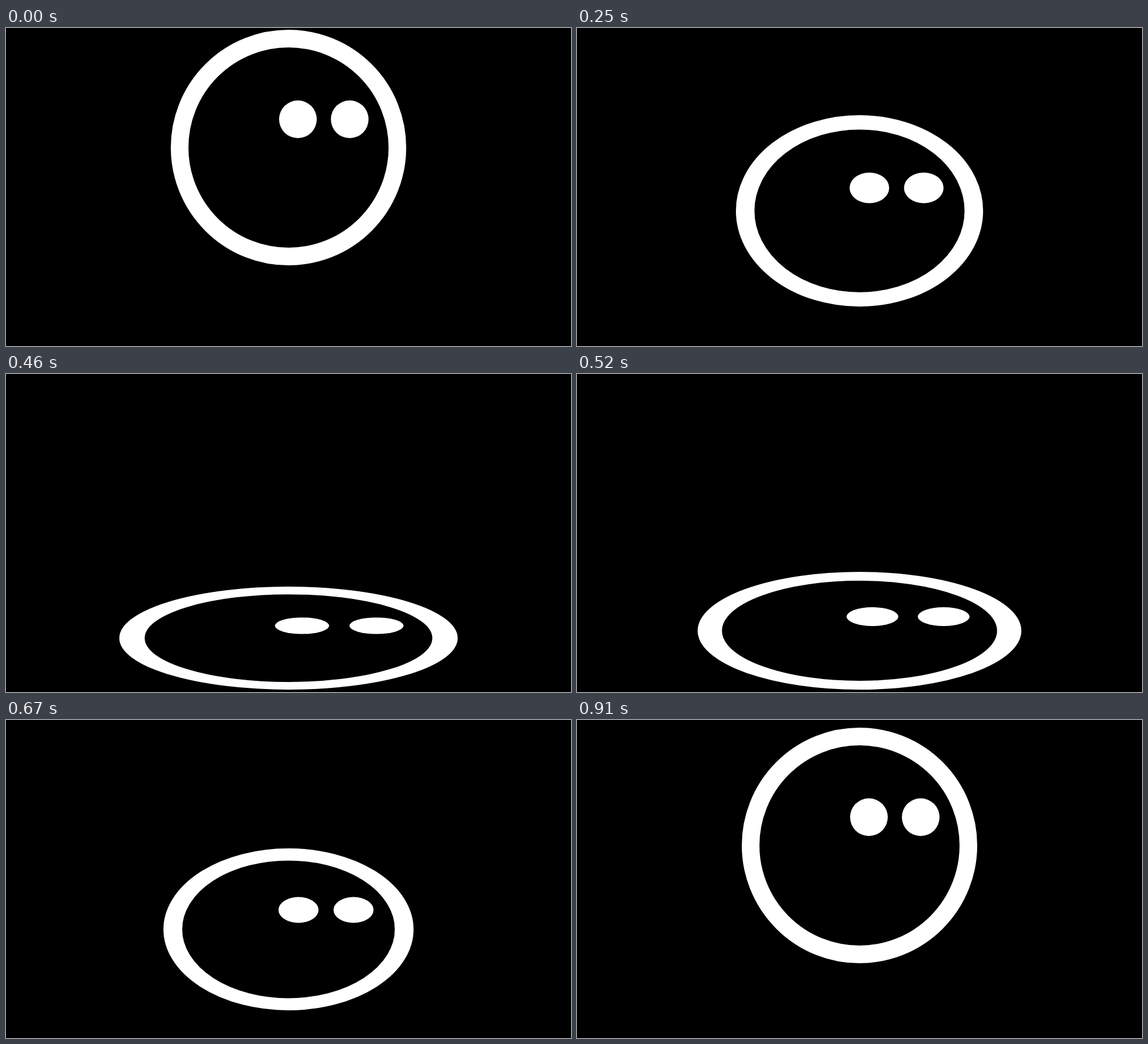
Animation, 960 px wide and 540 px high, one loop 940 ms. Source, as an HTML page:

```html
<!DOCTYPE html>
<html lang="en">
<head>
<meta charset="utf-8">
<title>Bouncing ball</title>
<style>
  html, body { margin: 0; width: 100%; height: 100%; overflow: hidden; background: #000; }
  svg { display: block; width: 100vw; height: 100vh; }
</style>
</head>
<body>
<svg viewBox="0 0 960 540">
  <rect width="960" height="540" fill="#000"/>
  <g id="ball" fill="#fff">
    <circle r="185" fill="none" stroke="#fff" stroke-width="30"/>
    <circle cx="16" cy="-48" r="32"/>
    <circle cx="104" cy="-48" r="32"/>
  </g>
</svg>
<script>
const LOOP = 940, HOLD = 70, STEP = 30;
const SIZE = 400, TOP = 403, GROUND = 523, SPEED = 10, SQUASH = 25;
const LAND = 11, FLAT = 14, LEAVE = 18, STEPS = 30;
const ball = document.getElementById('ball');

// Distance from the flattest pose; the recovery runs at half speed until take-off
function fromFlat(step) {
  if (step < FLAT) return FLAT - step;
  return Math.min(step - FLAT, LEAVE - FLAT) / 2 + Math.max(step - LEAVE, 0);
}

function draw(time) {
  const t = time % LOOP;
  const step = t < HOLD ? 0 : 1 + Math.floor((t - HOLD) / STEP);
  const d = SQUASH * fromFlat(step);
  const spread = step < LAND ? SPEED * (step - 5) : 0;
  const w = Math.max(SIZE, SIZE + spread, 550 - d);
  const h = Math.min(SIZE, 150 + d);
  const bottom = Math.min(GROUND, TOP + SPEED * Math.min(step, STEPS - step));

  // The ball swells while it rests on the ground
  const grounded = step >= LAND && step <= LEAVE;
  const swell = grounded ? SQUASH : 0;
  const y = bottom - h / 2 + (grounded ? 0.5 : 0);
  ball.setAttribute('transform',
    `translate(480 ${y}) scale(${(w + swell) / SIZE} ${(h + swell) / SIZE})`);
}

const start = performance.now();
function loop() {
  draw(performance.now() - start);
  requestAnimationFrame(loop);
}
draw(0);
requestAnimationFrame(loop);
</script>
</body>
</html>
```
